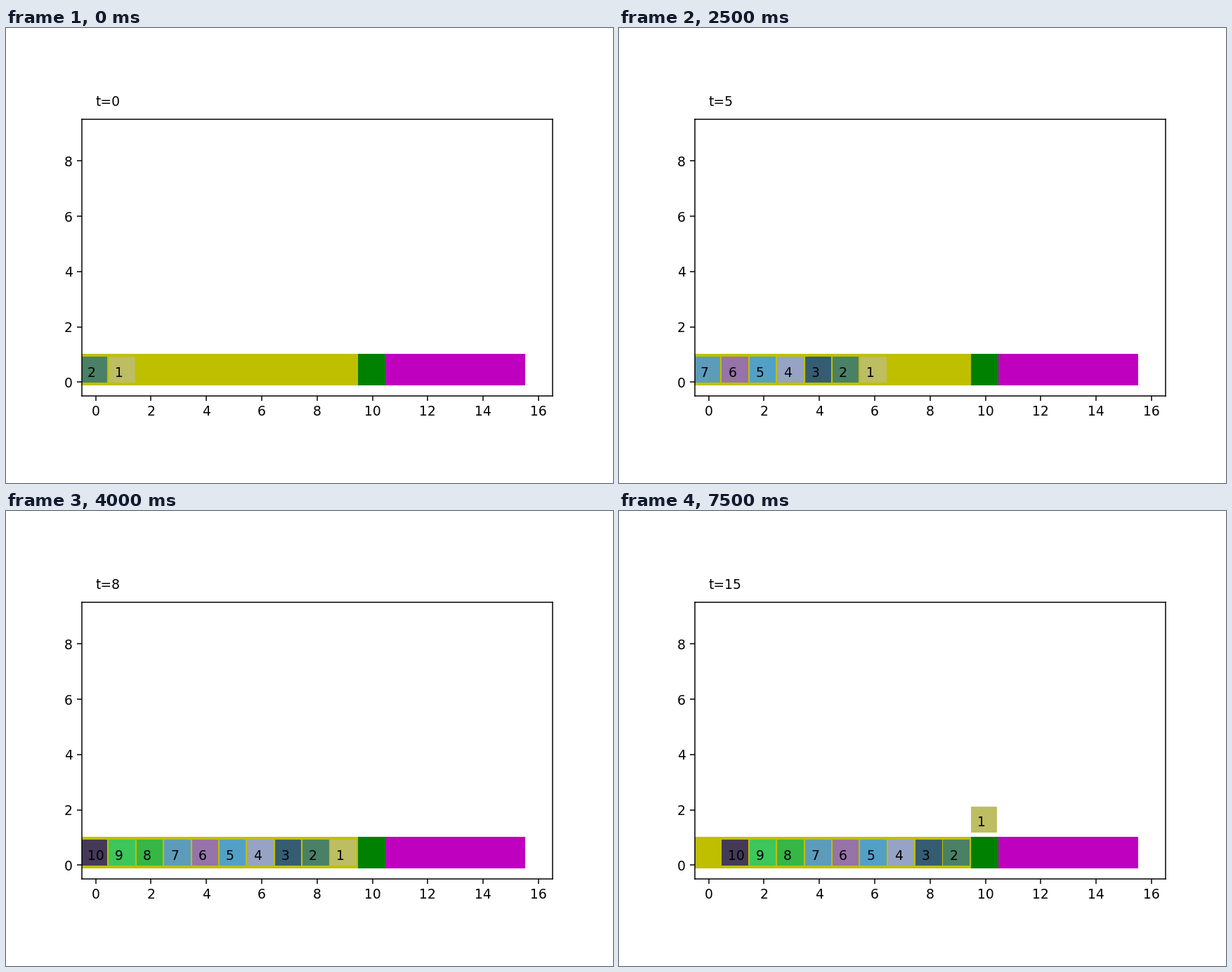
Write a matplotlib script that moves like this. It is 864 px wide and 648 px high and loops after 8000 ms.

```python
import matplotlib.pyplot as plt
from matplotlib.animation import FuncAnimation
from matplotlib.patches import Rectangle

STEPS = 16
INTERVAL = 500
GATE = 10        # column of the green cell
LIFT_STEP = 10   # step at which the first block rises
LIFT = 1.2
SIZE = 0.9
COLORS = ["#bdbd62", "#4a8065", "#355c72", "#96a3c4", "#52a0c6",
          "#9673a8", "#5d9bbb", "#35b645", "#3dc65a", "#443a57"]

plt.rcParams["font.family"] = "DejaVu Sans"
fig, ax = plt.subplots(figsize=(6.4, 4.8), dpi=135)
ax.set_aspect("equal")
ax.set_xlim(-0.5, 16.5)
ax.set_ylim(-0.5, 9.5)
ax.set_xticks(range(0, 17, 2))
ax.set_yticks(range(0, 9, 2))


def add_rect(x, y, w, h, color):
    return ax.add_patch(Rectangle((x, y), w, h, color=color, lw=1))


for left, width, color in [(-0.5, 10, "y"), (9.5, 1, "g"), (10.5, 5, "m")]:
    add_rect(left, -0.1, width, 1.1, color)

clock = ax.text(0, 10, "t=0")
blocks = [(add_rect(0, 0, SIZE, SIZE, color), ax.text(0, 0, str(n)))
          for n, color in enumerate(COLORS, 1)]


def update(step):
    clock.set_text(f"t={step}")
    # The queue advances one cell per step until its head reaches the gate.
    head = min(step + 1, GATE)
    for i, (rect, label) in enumerate(blocks):
        col = head - i
        y = LIFT if i == 0 and step >= LIFT_STEP else 0
        rect.set_xy((col - 0.5, y))
        label.set_position((col - 0.3, y + 0.2))
        rect.set_visible(col >= 0)
        label.set_visible(col >= 0)
    return [clock, *(artist for pair in blocks for artist in pair)]


ani = FuncAnimation(fig, update, frames=STEPS, interval=INTERVAL,
                    init_func=lambda: update(0), repeat=True, repeat_delay=0)
plt.show()
```
